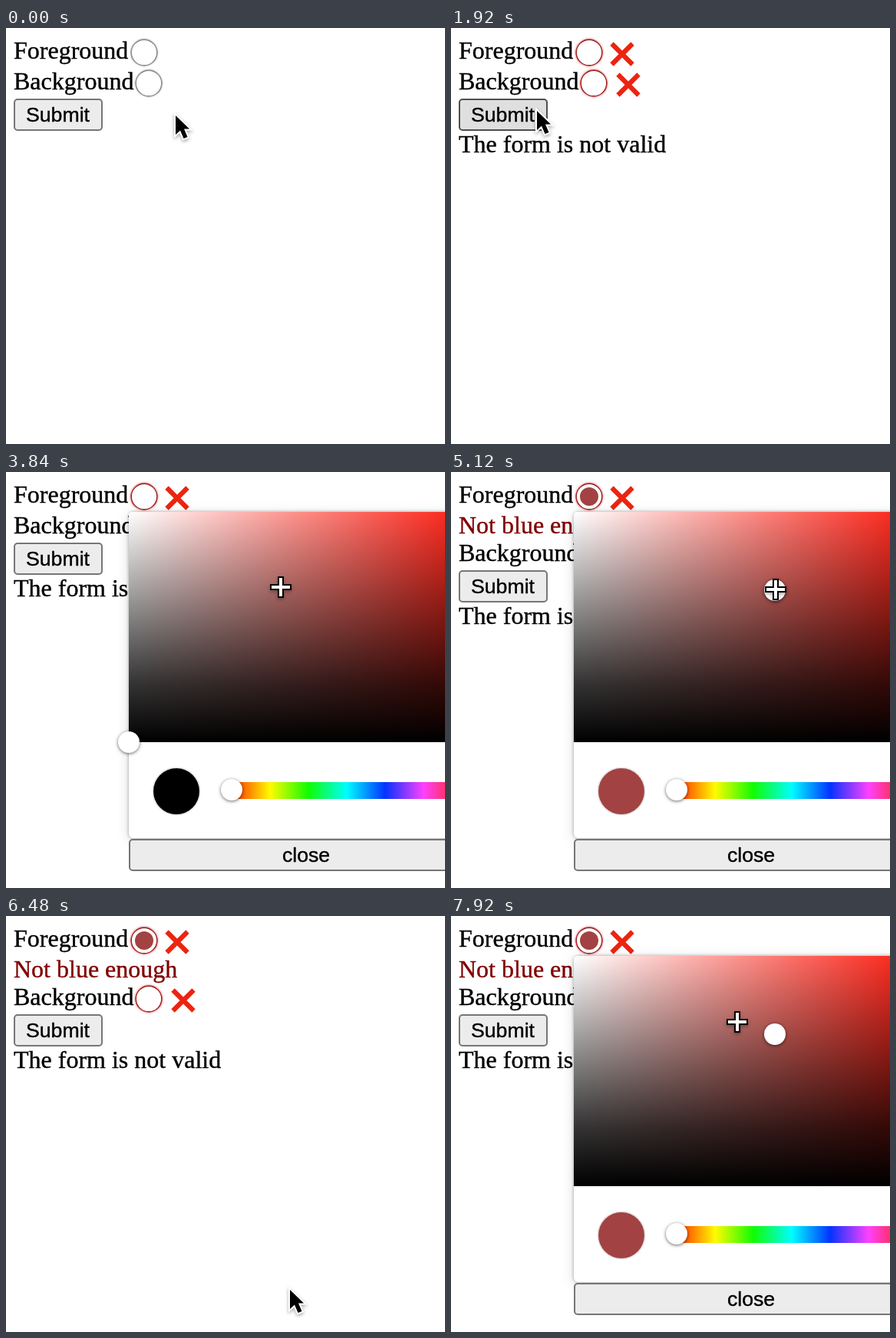
Recreate the animation shown at these times as an HTML page. Size 572 px wide and 542 px high, loop 8000 ms.

```html
<!DOCTYPE html>
<html lang="en">
<head>
<meta charset="utf-8">
<title>Colour form validation</title>
<style>
  html, body { margin: 0; width: 100%; height: 100%; overflow: hidden; background: #fff; }
  svg { display: block; }
  text { font: 32px "Liberation Serif", "Times New Roman", serif; stroke: currentColor; stroke-width: .4; }
  #error { color: #800000; fill: currentColor; }
  .btn text { font: 26.667px "Liberation Sans", Arial, sans-serif; text-anchor: middle; }
  .btn rect { fill: #ececec; stroke: #767676; stroke-width: 2; }
  .btn.hover rect { fill: #dfdfdf; stroke: #4f4f4f; }
  .btn.press rect { fill: #f1f1f1; stroke: #8d8d8d; }
  .field { fill: #fff; stroke: #8a8a8a; stroke-width: 1.4; filter: drop-shadow(0 0 1px #999); }
  .invalid .field { stroke: #962020; filter: drop-shadow(0 0 1.5px #e33); }
  .cross { display: none; stroke: #ec2410; stroke-width: 6.2; }
  .invalid .cross { display: inline; }
  .thumb { fill: #fff; filter: drop-shadow(0 1px 2px #0009); }
  .panel { fill: #fff; filter: drop-shadow(0 0 2px #0005) drop-shadow(0 3px 8px #0002); }
  .pointer { filter: drop-shadow(0 2px 2px #0005); }
</style>
</head>
<body>
<svg width="572" height="542" viewBox="0 0 572 542">
  <defs>
    <linearGradient id="sat"><stop stop-color="#fff"/><stop offset="1" stop-color="#fc1408"/></linearGradient>
    <linearGradient id="val" x2="0" y2="1">
      <stop stop-opacity="0"/><stop offset=".75" stop-opacity=".8"/><stop offset="1"/>
    </linearGradient>
    <linearGradient id="hue"></linearGradient>
    <path id="x" d="M-13.5 -13.5L13.5 13.5M13.5 -13.5L-13.5 13.5"/>
    <path id="area" d="M160 352V57q0-5 5-5H622V352z"/>
  </defs>

  <g id="form">
    <text x="10" y="40">Foreground</text>
    <circle class="field" cx="180" cy="32" r="16.8"/>
    <circle id="dot" cx="180" cy="32" r="12"/>
    <use class="cross" href="#x" x="223" y="34"/>
    <text id="error" x="10" y="80">Not blue enough</text>
    <g id="rest">
      <text x="10" y="80">Background</text>
      <circle class="field" cx="186" cy="72" r="16.8"/>
      <use class="cross" href="#x" x="231" y="74"/>
      <g id="submit" class="btn">
        <rect x="11" y="93" width="114" height="40" rx="4"/>
        <text x="67.5" y="122">Submit</text>
      </g>
      <text id="status" x="10" y="162">The form is not valid</text>
    </g>
  </g>

  <g id="picker">
    <rect class="panel" x="160" y="52" width="462" height="425" rx="6"/>
    <use href="#area" fill="url(#sat)"/>
    <use href="#area" fill="url(#val)"/>
    <circle id="swatch" cx="222" cy="416" r="30.7" stroke="#e2e2e2" stroke-width="1.5"/>
    <rect x="294" y="404" width="300" height="22" fill="url(#hue)"/>
    <circle class="thumb" cx="294" cy="414" r="14"/>
    <g id="close" class="btn">
      <rect x="161" y="479" width="460" height="40" rx="4"/>
      <text x="391" y="508">close</text>
    </g>
    <circle id="thumb" class="thumb" r="14"/>
  </g>

  <path id="arrow" class="pointer" d="M0 0V25L6 19.5L10.5 30L15.5 28L11 17.5H18z"
        stroke="#fff" stroke-width="4" paint-order="stroke"/>
  <path id="plus" class="pointer" d="M-2-12H2V-2H12V2H2V12H-2V2H-12V-2H-2z"
        fill="#fff" stroke="#000" stroke-width="4" paint-order="stroke"/>
</svg>
<script>
const $ = id => document.getElementById(id);
const LOOP = 8000, STEP = 80;
const INVALID = 1680, OPEN = 3600, PICK = 4720, CLOSE = 6240, REOPEN = 7600;

// Places the pointer visits
const idle = [221, 114], label = [30, 32], field = [186, 33], submit = [112, 108],
      mark = [210, 50], shade = [358, 150], pick = [423, 153], message = [130, 62],
      close = [370, 487], last = [373, 138];

// Each move: start time, end time, destination
const moves = [
  [0, 400, label], [480, 800, field], [800, 1280, submit], [2400, 2800, mark],
  [2880, 3360, [46, 34]], [3360, 3520, field], [3600, 3840, shade], [4160, 4640, pick],
  [5120, 5520, message], [5520, 5920, close], [6560, 7040, message], [7040, 7360, field],
  [7520, 7920, last]
];

$("hue").innerHTML = ["#ff2600", "#fffb00", "#10fc03", "#00fdff", "#0433ff", "#ff40ff", "#ff2600"]
  .map((c, i) => `<stop offset="${i / 6}" stop-color="${c}"/>`).join("");

const within = (v, a, b) => v >= a && v < b;
const show = (id, on) => $(id).style.display = on ? "" : "none";
const move = (id, x, y) => $(id).setAttribute("transform", `translate(${x} ${y})`);

function ease(t, a, b) {
  const u = Math.min(1, Math.max(0, (t - a) / (b - a)));
  return u * u * (3 - 2 * u);
}

function pointerAt(t) {
  return moves.reduce(([x, y], [a, b, to]) => {
    const e = ease(t, a, b);
    return [x + (to[0] - x) * e, y + (to[1] - y) * e];
  }, idle);
}

function setButton(id, hover, press) {
  $(id).setAttribute("class", "btn" + (press ? " press" : hover ? " hover" : ""));
}

function draw(t) {
  const [x, y] = pointerAt(t);
  const invalid = t >= INVALID, picked = t >= PICK;
  const open = within(t, OPEN, CLOSE) || t >= REOPEN;
  const shift = picked ? 36 : 0;
  const colour = picked ? "#a34242" : "#000";
  const overArea = open && x > 160 && within(y, 52, 352);

  $("form").setAttribute("class", invalid ? "invalid" : "");
  show("status", invalid);
  show("error", picked);
  show("dot", picked);
  show("picker", open);
  show("arrow", !overArea);
  show("plus", overArea);
  $("dot").setAttribute("fill", colour);
  $("swatch").setAttribute("fill", colour);

  move("rest", 0, shift);
  move("thumb", picked ? 422 : 160, picked ? 154 : 352);
  move("arrow", x, y);
  move("plus", x, y);

  const overSubmit = within(x, 10, 126) && within(y, 92 + shift, 134 + shift);
  setButton("submit", overSubmit, within(t, INVALID - 160, INVALID));
  setButton("close", open && x > 160 && within(y, 478, 520), within(t, CLOSE - 160, CLOSE));
}

function tick() {
  draw(Math.floor(performance.now() % LOOP / STEP) * STEP);
  requestAnimationFrame(tick);
}
tick();
</script>
</body>
</html>
```
